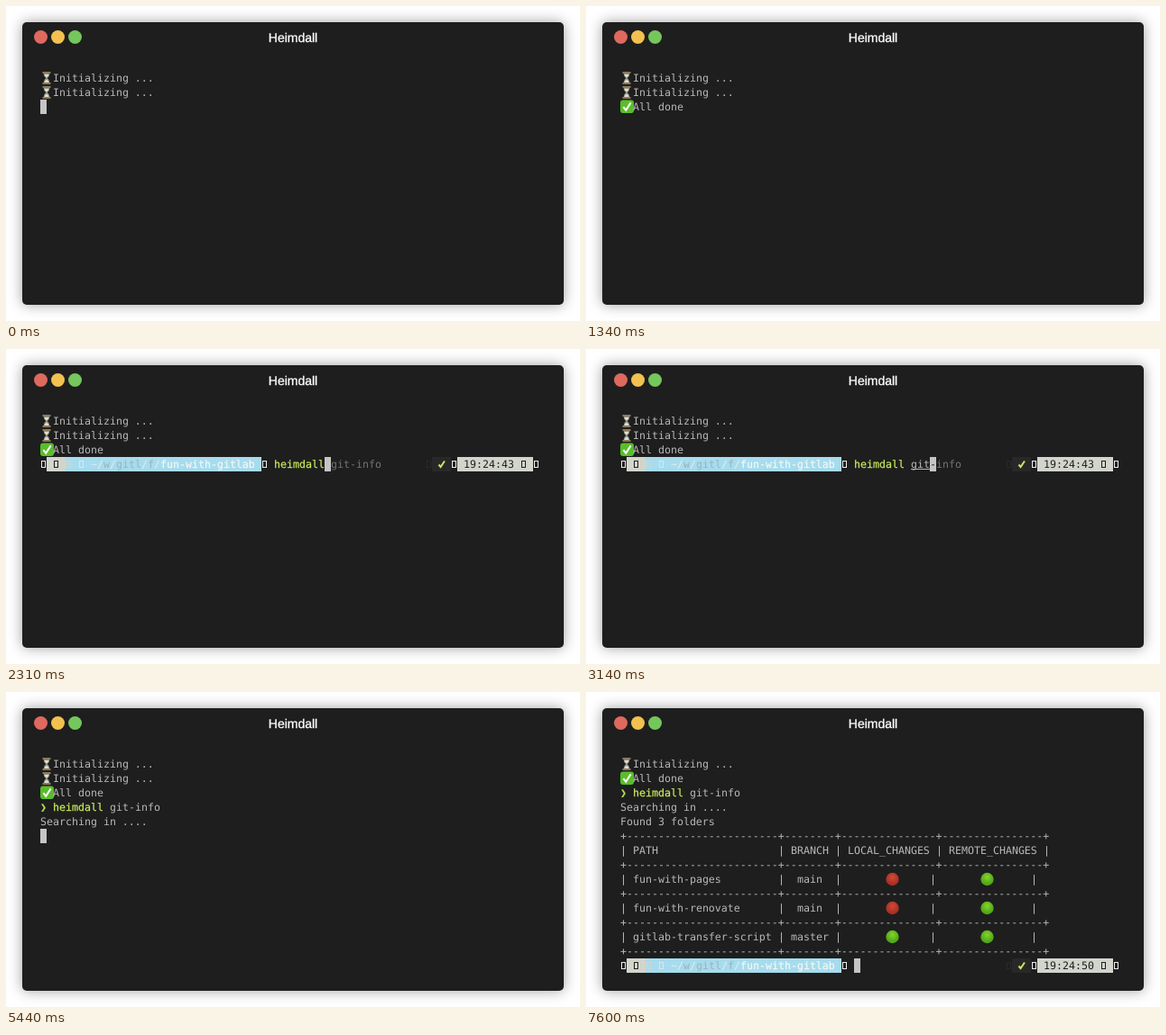
These frames come from a looping animation (636 by 350 pixels, 8 s). An HTML page:

```html
<!DOCTYPE html>
<html lang="en">
<head>
<meta charset="utf-8">
<title>Heimdall</title>
<style>
  html, body { margin: 0; width: 100%; height: 100%; overflow: hidden; background: #fff; }
  .window {
    position: absolute; left: 18px; top: 18px; width: 600px; height: 314px;
    border-radius: 5px; background: #1e1e1e; box-shadow: 0 0 15px rgba(0, 0, 0, .38);
  }
  svg { position: absolute; left: 0; top: 0; display: block; }
  text { white-space: pre; text-rendering: geometricPrecision; }
  #screen text { font: 11.627px "DejaVu Sans Mono", monospace; }
  .title { font: 14px "Liberation Sans", Arial, sans-serif; fill: #fff; stroke: #fff; stroke-width: .3px; }
</style>
</head>
<body>
<div class="window"></div>
<svg width="636" height="350" viewBox="0 0 636 350">
  <defs>
    <g id="hourglass">
      <path d="M3.5 2.5H10.5Q10.5 6 7.8 8Q10.5 10 10.5 13.5H3.5Q3.5 10 6.2 8Q3.5 6 3.5 2.5Z" fill="#8f938c"/>
      <path d="M4.6 4H9.4Q9 6 7 7.5Q5 6 4.6 4ZM7 9.5Q9.3 11 9.6 13H4.4Q4.7 11 7 9.5Z" fill="#e5dfca"/>
      <path d="M2.5 2H11.5M2.5 14H11.5" stroke="#8d7959" stroke-width="1.8"/>
    </g>
    <g id="done">
      <rect y="0.5" width="15" height="14.5" rx="3" fill="#59bd2b"/>
      <path d="M3.4 8.2L6.2 11.8L11.6 3.4" fill="none" stroke="#fff" stroke-width="2"/>
    </g>
    <radialGradient id="red" cy=".35"><stop stop-color="#d04a38"/><stop offset="1" stop-color="#ab3024"/></radialGradient>
    <radialGradient id="green" cy=".35"><stop stop-color="#86d52c"/><stop offset="1" stop-color="#51a818"/></radialGradient>
  </defs>
  <circle cx="38.5" cy="34.5" r="7.5" fill="#de695f"/>
  <circle cx="57.5" cy="34.5" r="7.5" fill="#f2c14f"/>
  <circle cx="76.5" cy="34.5" r="7.5" fill="#75c65c"/>
  <text class="title" x="318" y="40" text-anchor="middle">Heimdall</text>
  <g id="screen"></g>
</svg>
<script>
const LOOP = 8000;
const COMMAND = 'heimdall git-info';
const KEY_TIMES = [1640, 1710, 1780, 1850, 1920, 2010, 2110, 2210, 2570,
                   2970, 3080, 3140, 3430, 3530, 3820, 3920, 4160];
const STEPS = [0, 20, 950, 1030, 1230, 1340, 1440, ...KEY_TIMES, 2310, 4340, 5370, 5440, 7440, 7600]
  .sort((a, b) => a - b);
const INPUT_COL = 37;
const C = { text: '#b8b8b8', dim: '#737373', lime: '#c6e85c', pink: '#d6808c', gray: '#d2d5cc',
            blue: '#a6dcee', dark: '#1e1e1e', cursor: '#c5c5c5', white: '#f0f0f0', gold: '#eccb51' };

const x = col => 38 + col * 7;
const y = row => 72 + row * 16;

const text = (col, row, str, fill = C.text, style = '') =>
  `<text x="${x(col)}" y="${y(row) + 12}" fill="${fill}" style="${style}">${str}</text>`;
const block = (col, row, cols, fill) =>
  `<rect x="${x(col)}" y="${y(row)}" width="${cols * 7}" height="16" fill="${fill}"/>`;
const box = (col, row, color) =>
  `<rect x="${x(col) + 1.5}" y="${y(row) + 4.5}" width="4" height="7" fill="none" stroke="${color}"/>`;
const icon = (name, row) => `<use href="#${name}" x="38" y="${y(row)}"/>`;
const cursor = (col, row, char = '') => block(col, row, 1, C.cursor) + text(col, row, char, C.dark);
const strong = color => `stroke:${color};stroke-width:.25px`;

const initializing = row => icon('hourglass', row) + text(2, row, 'Initializing ...');
const allDone = row => icon('done', row) + text(2, row, 'All done');

function prompt(row, time, tick) {
  const cx = x(63), cy = y(row);
  return box(0, row, C.white) + block(1, row, 3, C.gray) + box(2, row, C.dark) +
    block(4, row, 31, C.blue) + box(4, row, C.gray) + box(6, row, '#d8e8e8') +
    text(8, row, '~/', '#e4ece9') + text(10, row, 'w', '#9eb1b3') + text(11, row, '/', '#e4ece9') +
    text(12, row, 'gitl', '#9eb1b3') + text(16, row, '/', '#e4ece9') + text(17, row, 'f', '#9eb1b3') +
    text(18, row, '/', '#e4ece9') + text(19, row, 'fun-with-gitlab', '#f3f6f3', strong('#f3f6f3')) +
    box(35, row, C.white) +
    box(61, row, '#292929') + block(62, row, 3, '#282828') +
    `<path d="M${cx + .5} ${cy + 8.5}L${cx + 2.6} ${cy + 11}L${cx + 7} ${cy + 4.5}" fill="none" stroke="${tick}" stroke-width="2"/>` +
    box(65, row, C.white) + block(66, row, 12, C.gray) + text(67, row, time, C.dark) +
    box(76, row, C.dark) + box(78, row, C.white);
}

function commandLine(t) {
  const typed = KEY_TIMES.filter(k => k <= t).length;
  const valid = t >= 2310;
  const nameColor = valid ? C.lime : C.pink;
  const name = COMMAND.slice(0, Math.min(typed, 8));
  const arg = COMMAND.slice(9, Math.max(typed, 9));
  const underline = arg.length && arg.length < 4
    ? `<path d="M${x(46)} ${y(3) + 13.5}h${arg.length * 7}" stroke="${C.text}"/>` : '';
  const hint = typed ? COMMAND.slice(typed) : '';
  return prompt(3, '19:24:43', valid ? C.lime : C.gold) +
    text(INPUT_COL, 3, name, nameColor, strong(nameColor)) +
    text(INPUT_COL + 9, 3, arg) + underline +
    text(INPUT_COL + typed + 1, 3, hint.slice(1), C.dim) +
    cursor(INPUT_COL + typed, 3, hint[0]);
}

const submitted = row => text(0, row, '❯', '#b5df55', strong('#b5df55')) +
  text(2, row, 'heimdall', C.lime, strong(C.lime)) + text(11, row, 'git-info');

function table(row) {
  const border = '+' + [24, 8, 15, 16].map(n => '-'.repeat(n)).join('+') + '+';
  const cells = (r, cols, ...parts) =>
    cols.map(c => text(c, r, '|')).join('') + parts.map(([c, s]) => text(c, r, s)).join('');
  const light = (cx, r, color) => `<circle cx="${cx}" cy="${y(r) + 8}" r="7.2" fill="url(#${color})"/>`;
  const repos = [['fun-with-pages', 'main', 28, 'red'], ['fun-with-renovate', 'main', 28, 'red'],
                 ['gitlab-transfer-script', 'master', 27, 'green']];
  let out = [0, 2, 4, 6, 8].map(i => text(0, row + i, border)).join('') +
    cells(row + 1, [0, 25, 34, 50, 67],
      [2, 'PATH'], [27, 'BRANCH'], [36, 'LOCAL_CHANGES'], [52, 'REMOTE_CHANGES']);
  repos.forEach(([path, branch, col, local], i) => {
    const r = row + 3 + i * 2;
    out += cells(r, [0, 25, 34, 49, 65], [2, path], [col, branch]) +
      light(339.5, r, local) + light(444.5, r, 'green');
  });
  return out;
}

function picture(t) {
  if (t >= 7440) {
    return initializing(0) + allDone(1) + submitted(2) + text(0, 3, 'Searching in ....') +
      text(0, 4, 'Found 3 folders') + table(5) +
      (t < 7600 ? cursor(0, 14) : prompt(14, '19:24:50', C.lime) + cursor(INPUT_COL, 14));
  }
  let out = initializing(0) + initializing(1);
  if (t < 20) return out + cursor(0, 2);
  if (t < 950) return out;
  out += allDone(2);
  if (t < 1030) return out + cursor(10, 2);
  if (t < 1440) return out + (t >= 1230 && t < 1340 ? cursor(0, 3) : '');
  if (t < 5370) return out + commandLine(t);
  out += submitted(3);
  return out + (t < 5440 ? cursor(0, 4) : text(0, 4, 'Searching in ....') + cursor(0, 5));
}

const screen = document.getElementById('screen');
const start = performance.now();
let shown = -1;

function draw(now) {
  const t = Math.max(0, now - start) % LOOP;
  const step = STEPS.filter(s => s <= t).pop();
  if (step !== shown) {
    screen.innerHTML = picture(step);
    shown = step;
  }
  requestAnimationFrame(draw);
}
draw(start);
</script>
</body>
</html>
```
